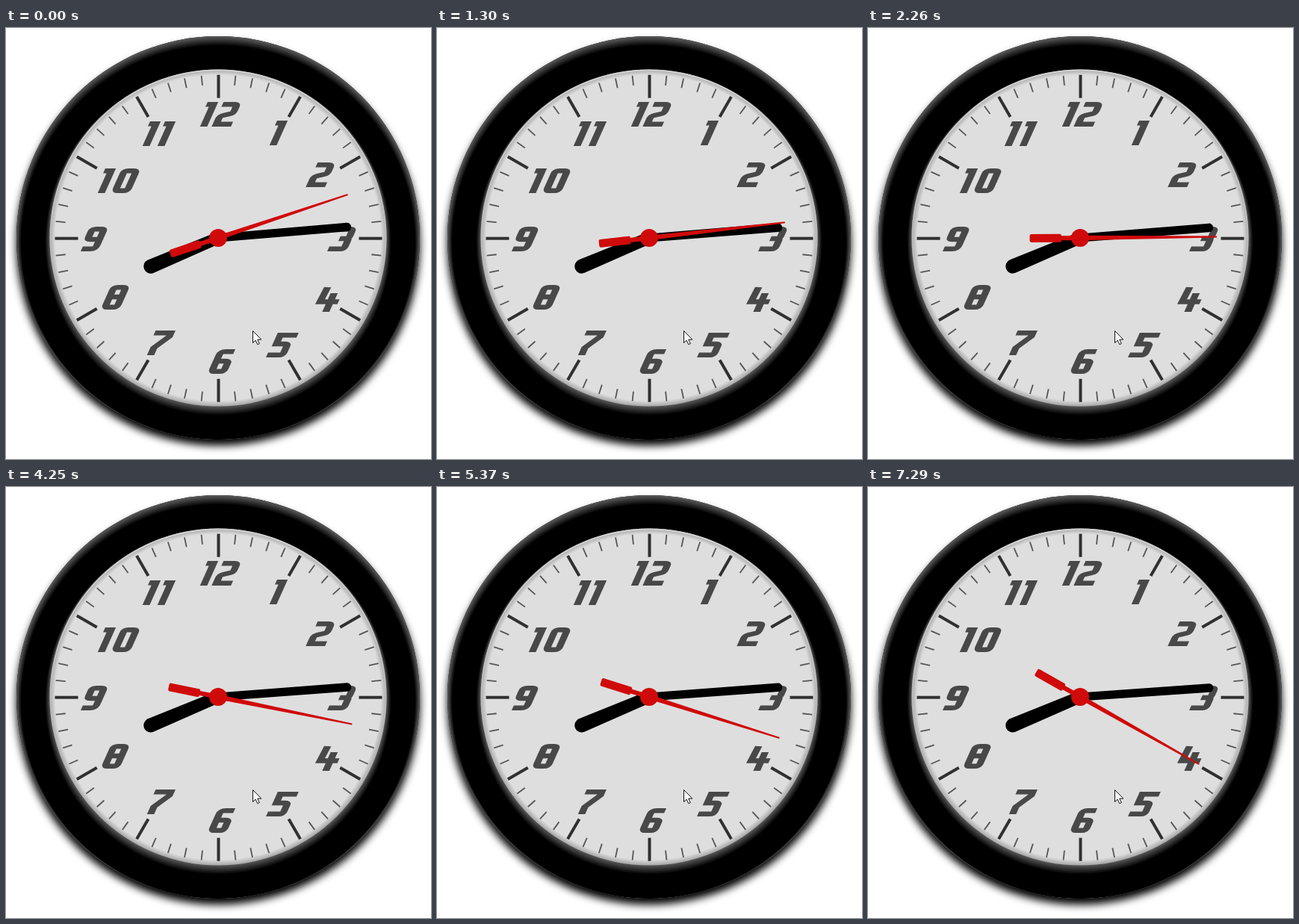
An HTML page with a canvas for the animation above (8000 ms loop, 569 by 577 pixels).

```html
<!DOCTYPE html>
<html lang="en">
<head>
<meta charset="utf-8">
<title>Wall clock</title>
<style>
  html, body { margin: 0; width: 100%; height: 100%; overflow: hidden; background: #fff; }
  canvas { display: block; }
</style>
</head>
<body>
<canvas id="clock" width="569" height="577"></canvas>
<script>
const W = 569, H = 577, CX = 284, CY = 281;
const LOOP = 8000, FIRST_SECOND = 12;
const TICKS = [270, 1300, 2260, 3290, 4250, 5370, 6300, 7290];
const RED = '#d00a0a', INK = '#484848';

const view = document.getElementById('clock').getContext('2d');
const dial = document.createElement('canvas');
dial.width = W;
dial.height = H;

// Digit centrelines in an 18 x 33 box; 8 and 9 are derived from 0 and 6.
const DIGITS = {
  0: 'M6.5 3.3H11.5Q14.5 3.3 14.5 6.5V26.5Q14.5 29.7 11.5 29.7H6.5Q3.5 29.7 3.5 26.5V6.5Q3.5 3.3 6.5 3.3Z',
  1: 'M-2 3.3H4.5V33',
  2: 'M1 3.3H11.5Q14.5 3.3 14.5 6.5V12Q14.5 15 12 16L6 18Q3.5 19 3.5 22V29.7H18',
  3: 'M1 3.3H11.5Q14.5 3.3 14.5 6.5V13Q14.5 16 12 16H6M12 16Q14.5 16 14.5 19V26.5Q14.5 29.7 11.5 29.7H0',
  4: 'M4 0L3 19.5H20M12.5 8V33',
  5: 'M20 3.3H4V15H11.5Q14.5 15 14.5 18V26.5Q14.5 29.7 11.5 29.7H0',
  6: 'M16 3.3H7.5Q3.5 3.3 3.5 8V26.5Q3.5 29.7 6.5 29.7H11.5Q14.5 29.7 14.5 26.5V19Q14.5 16 11.5 16H4',
  7: 'M-1 3.3H14V8L4.5 23V33'
};

// Digit, left edge, baseline.
const NUMERALS = [
  [1, 258, 132], [2, 275, 132], [1, 351, 157], [2, 401, 213],
  [3, 430, 299], [4, 410, 380], [5, 348, 441], [6, 269, 463],
  [7, 187, 438], [8, 126, 377], [9, 97, 299],
  [1, 121, 221], [0, 140, 221], [1, 181, 158], [1, 201, 158]
];

function disc(g, r, fill) {
  g.beginPath();
  g.arc(CX, CY, r, 0, Math.PI * 2);
  g.fillStyle = fill;
  g.fill();
}

function ring(g, y0, r0, y1, r1, from, to) {
  const grad = g.createRadialGradient(CX, y0, r0, CX, y1, r1);
  grad.addColorStop(0, from);
  grad.addColorStop(1, to);
  return grad;
}

// Runs draw() with "up" pointing at the given clockwise angle.
function turned(g, degrees, draw) {
  g.save();
  g.translate(CX, CY);
  g.rotate(degrees * Math.PI / 180);
  draw();
  g.restore();
}

function drawCase(g) {
  g.save();
  g.shadowColor = '#000';
  g.shadowBlur = 11;
  g.shadowOffsetY = 8;
  disc(g, 270, '#000');
  g.restore();
  disc(g, 270, ring(g, CY + 6, 263.5, CY, 270, '#000', '#5c5c5c'));
  disc(g, 240, ring(g, CY, 225, CY + 6, 231.5, '#5a5a5a', '#000'));
  disc(g, 225.5, ring(g, CY, 218, CY, 225.5, '#dedede', '#a6a6a6'));

  // Light catching the upper lip of the face.
  const lip = g.createLinearGradient(0, CY - 225, 0, CY + 150);
  lip.addColorStop(0, 'rgba(216,216,216,.9)');
  lip.addColorStop(1, 'rgba(216,216,216,0)');
  g.beginPath();
  g.arc(CX, CY, 224.7, 0, Math.PI * 2);
  g.lineWidth = 1.8;
  g.strokeStyle = lip;
  g.stroke();
}

function drawMarks(g) {
  g.save();
  g.translate(0.5, 0.7);
  for (let i = 0; i < 60; i++) {
    const major = i % 5 === 0;
    turned(g, i * 6, () => {
      g.beginPath();
      g.moveTo(0, major ? -188 : -206);
      g.lineTo(0, -219);
      g.lineWidth = major ? 4 : 1.8;
      g.strokeStyle = major ? '#303030' : '#555';
      g.stroke();
    });
  }
  g.restore();
}

function drawDigit(g, digit, x, y) {
  const trace = d => g.stroke(new Path2D(d));
  g.save();
  g.translate(x, y);
  g.transform(1.45, 0, -0.45, 1, 0, 0);
  g.translate(0, -33);
  g.strokeStyle = INK;
  g.lineWidth = 6.6;
  if (digit === 9) {
    g.translate(18, 33);
    g.scale(-1, -1);
    trace(DIGITS[6]);
  } else if (digit === 8) {
    trace(DIGITS[0]);
    trace('M4 16H14');
  } else {
    trace(DIGITS[digit]);
  }
  g.restore();
}

function drawPointer(g) {
  g.save();
  g.translate(330.5, 405.5);
  const arrow = new Path2D('M0 0V16L3.6 12.6L6.3 18.2L8.8 17L6.2 11.6H11.3Z');
  g.fillStyle = '#fff';
  g.fill(arrow);
  g.strokeStyle = '#111';
  g.lineWidth = 1;
  g.stroke(arrow);
  g.restore();
}

// Tapered hand with a round end.
function drawHand(degrees, length, base, tip) {
  turned(view, degrees, () => {
    view.beginPath();
    view.moveTo(-base, 0);
    view.lineTo(-tip, -length);
    view.arc(0, -length, tip, Math.PI, 0);
    view.lineTo(base, 0);
    view.fillStyle = '#000';
    view.fill();
  });
}

function drawSecondHand(degrees) {
  turned(view, degrees, () => {
    view.fillStyle = RED;
    view.beginPath();
    view.moveTo(-3, 28);
    view.lineTo(-3.2, 0);
    view.lineTo(-1, -183);
    view.lineTo(1, -183);
    view.lineTo(3.2, 0);
    view.lineTo(3, 28);
    view.fill();
    view.beginPath();
    view.roundRect(-5.5, 25, 11, 42.5, 2.5);
    view.fill();
  });
  disc(view, 12, RED);
}

function render(time) {
  const second = FIRST_SECOND + TICKS.filter(at => time >= at).length;
  const minute = 14 + second / 60;
  const hour = 8 + minute / 60;
  view.clearRect(0, 0, W, H);
  view.drawImage(dial, 0, 0);
  drawHand(hour * 30, 98, 8, 9.5);
  drawHand(minute * 6, 173, 5.6, 5.8);
  drawSecondHand(second * 6 - 0.5);
  drawPointer(view);
}

const face = dial.getContext('2d');
drawCase(face);
drawMarks(face);
NUMERALS.forEach(n => drawDigit(face, ...n));

const start = performance.now();
function loop() {
  render((performance.now() - start) % LOOP);
  requestAnimationFrame(loop);
}
loop();
</script>
</body>
</html>
```
